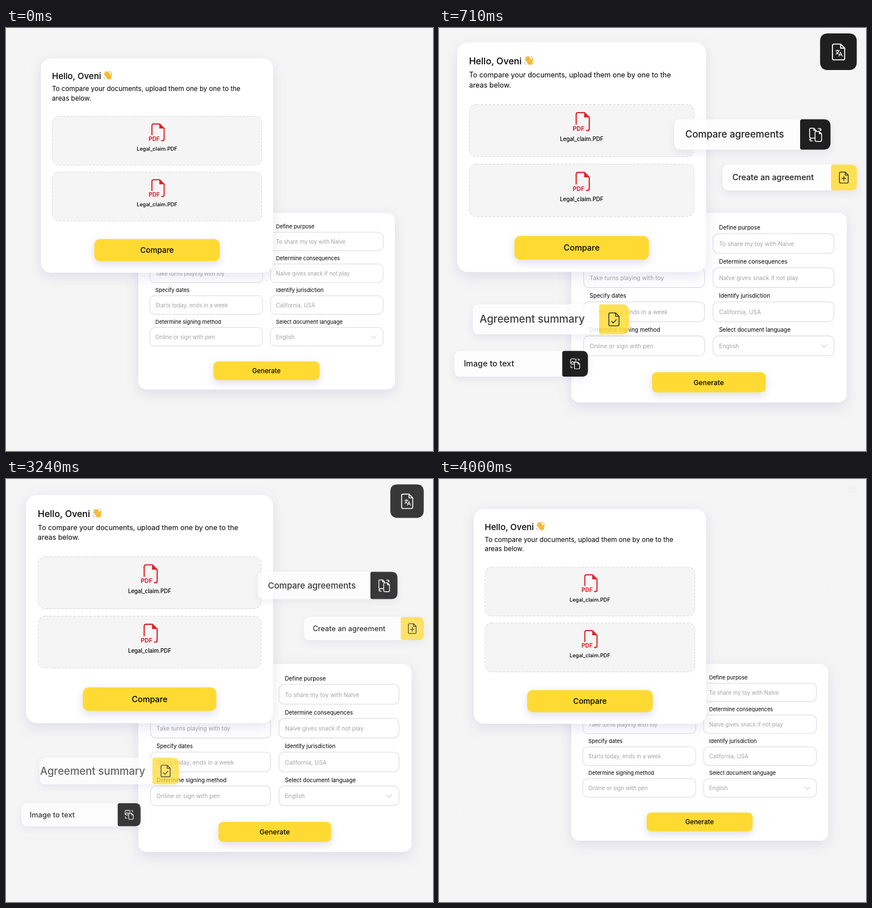
These frames come from a looping animation (752x745 px, 4.03 s). An HTML page:

```html
<!DOCTYPE html>
<html lang="en">
<head>
<meta charset="utf-8">
<title>Document tools</title>
<style>
html, body { margin: 0; width: 100%; height: 100%; overflow: hidden; background: #f5f5f5; }
svg { display: block; width: 100%; height: 100%; font-family: Inter, "Open Sans", sans-serif; }
.panel { fill: #fff; filter: drop-shadow(0 7px 11px rgba(85, 80, 165, .15)); }
.card { fill: #fff; filter: drop-shadow(0 6px 8px rgba(85, 80, 165, .12)); }
.cta { fill: #ffda33; filter: drop-shadow(0 5px 7px rgba(80, 80, 150, .2)); }
.drop { fill: #f5f5f5; stroke: #d8d8d8; stroke-dasharray: 4 2.6; }
.field { fill: #fff; stroke: #d9d9dc; }
.hint { fill: #a3a3a3; }
.mid { text-anchor: middle; }
.bold { font-weight: 500; }
.line { fill: none; stroke-linecap: round; stroke-linejoin: round; }
</style>
</head>
<body>
<svg id="stage" viewBox="0 0 752 745"></svg>
<script>
const LOOP = 4030;
const stage = document.getElementById('stage');

const rect = (cls, x, y, w, h, r) =>
  `<rect class="${cls}" x="${x}" y="${y}" width="${w}" height="${h}" rx="${r}"/>`;
const text = (str, x, y, size, cls = '') =>
  `<text class="${cls}" x="${x}" y="${y}" font-size="${size}">${str}</text>`;
const line = (d, color, width, fill = 'none') =>
  `<path class="line" d="${d}" stroke="${color}" stroke-width="${width}" style="fill:${fill}"/>`;

// Sheet outline with a folded top right corner
function sheet(x, y, w, h, fold, r = 2.5) {
  return `M${x + w - fold} ${y}H${x + r}q${-r} 0 ${-r} ${r}v${h - 2 * r}q0 ${r} ${r} ${r}` +
    `h${w - 2 * r}q${r} 0 ${r} ${-r}V${y + fold}zv${fold}h${fold}`;
}

// Square tile with tighter left corners
function tile(x, y, size, a, b, color) {
  return `<path fill="${color}" d="M${x + a} ${y}h${size - a - b}q${b} 0 ${b} ${b}v${size - 2 * b}` +
    `q0 ${b} ${-b} ${b}h${a + b - size}q${-a} 0 ${-a} ${-a}v${2 * a - size}q0 ${-a} ${a} ${-a}z"/>`;
}

function pdf(dy) {
  const red = '#e0222a';
  return `<g transform="translate(0 ${dy})">` +
    rect('drop', 81.5, 155.5, 369, 86, 12) +
    line('M257 188V172q0-3 3-3H270.5L278.5 177V195.5q0 3-3 3H274', red, 2) +
    `<path fill="${red}" d="M270 168.5v8.5h9z"/>` +
    `<text class="mid" x="261" y="199.2" font-size="10" font-weight="700" fill="${red}">PDF</text>` +
    text('Legal_claim.PDF', 266, 216, 9.1, 'mid bold') + '</g>';
}

function wave() {
  const skin = '#f7bd3c';
  return line('M180 86L173.4 82.2M180 84L174 79M181 83L176.4 77.3M182 83L179.4 77.6', skin, 2.4) +
    line('M184 87Q184.2 84 185.2 80.6', skin, 2.5) +
    `<ellipse cx="180.6" cy="86" rx="5.4" ry="4.3" transform="rotate(35 180.6 86)" fill="${skin}"/>` +
    line('M178 83.6L175.6 81.4M180 82.2L177.8 79.2M182 86q-2 .4-2.6 2.4', '#d98f27', .5) +
    line('M172 86.6q.4 2.6 2.6 3.6M182.4 76.4q2.2.2 3 2', '#8a8f98', .8);
}

function comparePanel() {
  return rect('panel', 61.5, 53.3, 409, 377.7, 18) +
    text('Hello, Oveni', 81, 90, 15, 'bold') + wave() +
    text('To compare your documents, upload them one by one to the', 81, 111, 11.63) +
    text('areas below.', 81, 127.8, 11.63) +
    pdf(0) + pdf(98.3) +
    rect('cta', 155.5, 371.7, 221, 39, 10) +
    text('Compare', 266, 396, 13.5, 'mid bold');
}

function formPanel() {
  const rows = [
    ['', '', 'Define purpose', 'To share my toy with Nalve'],
    ['', 'Take turns playing with toy', 'Determine consequences', 'Nalve gives snack if not play'],
    ['Specify dates', 'Starts today, ends in a week', 'Identify jurisdiction', 'California, USA'],
    ['Determine signing method', 'Online or sign with pen', 'Select document language', 'English']
  ];
  let out = rect('panel', 233, 325.7, 452, 311, 14);
  rows.forEach((row, i) => {
    [253.3, 465.7].forEach((x, col) => {
      const y = 359.6 + 56 * i;
      out += text(row[col * 2], x + 9.8, y - 6.4, 9.3) +
        rect('field', x, y, 198.5, 32.6, 8.5) +
        text(row[col * 2 + 1], x + 9.8, y + 20.4, 9.65, 'hint');
    });
  });
  return out + line('M643.5 542L648 546.3L652.5 542', '#c9c9cc', 1) +
    rect('cta', 365.5, 587.2, 186.5, 33, 8) +
    text('Generate', 458.6, 608, 11.4, 'mid bold');
}

const INK = '#1d1d1d', YELLOW = '#ffdd3c', WHITE = '#fff';

const icons = {
  translate: line(sheet(688, 30.5, 24, 31, 8, 3), WHITE, 2) +
    line('M694.5 43.5h7.5M698.2 41.7v1.8M700.4 43.5q-1 5-5.6 7M695.8 45.5q1.4 3.2 4 4.6' +
      'M700.5 54.5l3.3-8.5l3.3 8.5M701.6 51.8h4.4', WHITE, 1.4),
  compare: line(sheet(647.5, 175, 13, 19.5, 4.5), WHITE, 1.7) +
    line(sheet(658.5, 181.5, 13, 20, 4.5), WHITE, 1.7, '#000') +
    line('M664.5 175.5h5v3.5M667.8 177.8l1.7 1.7l1.7-1.7M653.8 200.5h-5v-3.5M647 198l1.7-1.7l1.7 1.7', WHITE, 1.4),
  create: line(sheet(701, 252.5, 17.5, 22, 6), INK, 1.7) +
    line('M709.8 261.3v8M705.8 265.3h8', INK, 1.7),
  summary: line(sheet(333, 498.5, 20.5, 26, 7), INK, 1.8) +
    line('M338.6 515.6l3.2 3.4l6.2-6.8', INK, 1.8),
  image: line('M262.5 581.5h6.5q2 0 2 2v6.5q0 2-2 2h-6.5q-2 0-2-2v-6.5q0-2 2-2z' +
      'M261 590l3.2-3.5l2.4 2.5l1.6-1.6l2.6 2.6', WHITE, 1.3) +
    line(sheet(268.2, 588.2, 10.5, 13.3, 3.6, 1.8), WHITE, 1.4, '#000') +
    line('M273.5 582h.8M276.5 582h.8v3M261 595.5v3.5h3.5', WHITE, 1.3)
};

const card = (x, y, w, h) => rect('card', x, y, w, h, 12);

// Each badge scales about its anchor (ax, ay); dx, dy offset it while closed
const badges = [
  { ax: 735.7, ay: 9.5, min: .21, dx: 0, dy: 0,
    art: tile(663.7, 9.5, 72, 16, 16, '#000') + icons.translate },
  { ax: 689.5, ay: 187.5, min: .06, dx: 0, dy: 0,
    art: card(375.5, 157, 314, 61) + text('Compare agreements', 398, 194.2, 19.2, 'bold') +
      tile(628.5, 157, 61, 4, 14, '#000') + icons.compare },
  { ax: 736, ay: 263.3, min: .06, dx: 0, dy: 0,
    art: card(466, 237.3, 270, 52) + text('Create an agreement', 486, 269, 16.3, 'bold') +
      tile(684, 237.3, 52, 4, 12, YELLOW) + icons.create },
  { ax: 60, ay: 511.5, min: .06, dx: -3, dy: 12,
    art: card(60, 481.5, 313.5, 60) +
      '<g id="title">' + text('Agreement summary', 0, 6.4, 18.5, 'mid bold') +
      text('Agreement summary', 0, 1, 2.8, 'mid') + '</g>' +
      tile(313.5, 481.5, 60, 4, 14, YELLOW) + icons.summary },
  { ax: 27, ay: 591.3, min: .06, dx: 0, dy: 0,
    art: card(27, 565.5, 268.5, 51.6) + text('Image to text', 46, 597, 16.3, 'bold') +
      tile(243.7, 565.5, 51.6, 4, 12, '#000') + icons.image }
];

stage.innerHTML = `<g id="form">${formPanel()}</g><g id="compare">${comparePanel()}</g>` +
  badges.map((b, i) => `<g id="badge${i}">${b.art}</g>`).join('');

const $ = id => document.getElementById(id);
const place = (el, x, y, s, ax, ay) =>
  el.setAttribute('transform', `translate(${x} ${y}) scale(${s}) translate(${-ax} ${-ay})`);
const form = $('form'), compare = $('compare'), title = $('title');
badges.forEach((b, i) => { b.el = $('badge' + i); });

function ease(x) {
  x = Math.min(1, Math.max(0, x));
  return x < .5 ? .5 * (2 * x) ** 3.5 : 1 - .5 * (2 - 2 * x) ** 3.5;
}

function openness(t) {
  if (t < 1170) return ease((t - 32) / 1030);
  if (t < 3040) return 1;
  return Math.max(.012, 1 - ease((t - 2786) / 1135));
}

function draw(t) {
  const p = openness(t);
  place(form, 233, 325.7, 1 + .084 * p, 233, 325.7);
  place(compare, 470.5, 431 - 1.3 * p, 1 + .083 * p, 470.5, 431);
  for (const b of badges) {
    const q = 1 - p;
    place(b.el, b.ax + b.dx * q, b.ay + b.dy * q, b.min + (1 - b.min) * p, b.ax, b.ay);
    b.el.setAttribute('opacity', p);
  }
  // This caption keeps its size while its card scales
  title.setAttribute('transform', `translate(179 511.5) scale(${1 / (.06 + .94 * p)})`);
  title.children[0].setAttribute('opacity', p);
  title.children[1].setAttribute('opacity', 1 - p);
}

const start = performance.now();
function tick() {
  draw((performance.now() - start) % LOOP);
  requestAnimationFrame(tick);
}
draw(0);
requestAnimationFrame(tick);
</script>
</body>
</html>
```
